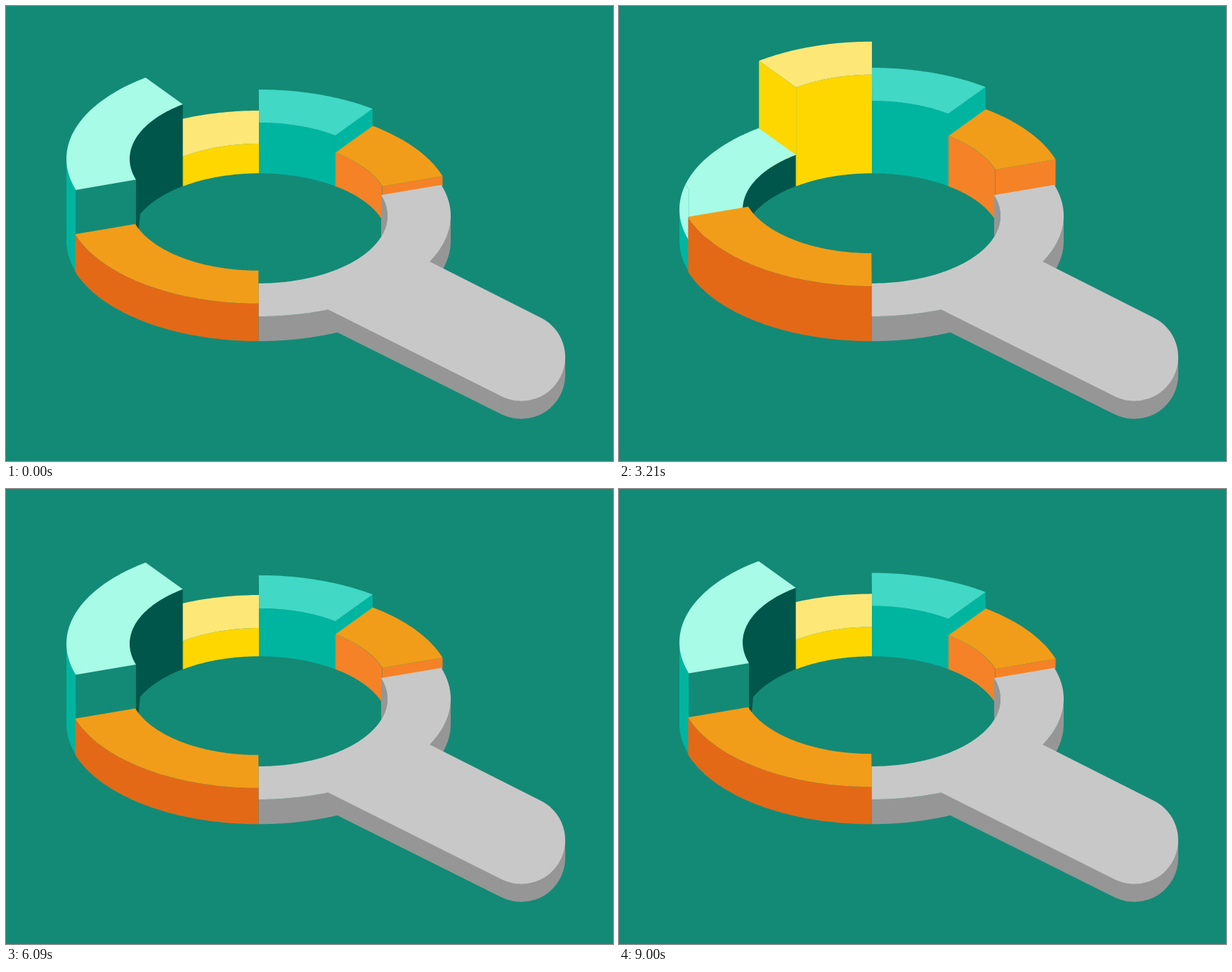
An HTML page with a canvas for the animation above (9.03 s loop, 864 by 648 pixels).

```html
<!DOCTYPE html>
<html lang="en">
<head>
<meta charset="utf-8">
<title>Magnifier chart</title>
<style>
html, body { margin: 0; width: 100%; height: 100%; overflow: hidden; background: #138a76; }
canvas { display: block; width: 864px; height: 648px; }
</style>
</head>
<body>
<canvas id="stage" width="864" height="648"></canvas>
<script>
const ctx = document.getElementById('stage').getContext('2d');
const LOOP = 9030, STEP = 30;
const BG = '#138a76';
const OUT = { rx: 273.5, ry: 143 }, IN = { rx: 183.5, ry: 96 };
const BASE = 334.3, GREY = 299;

// Height of the centre of each top face at the key times
const TIMES = [0, 3210, 4650, 6180, 7410, LOOP];
const KEYS = {
  mint:   [217.7, 289.7, 256, 218.2, 252.2, 217.7],
  yellow: [292, 193.7, 246.5, 297, 311.5, 292],
  teal:   [262, 231, 248, 267, 290, 262],
  amber:  [286.5, 262.7, 273.4, 285.1, 261.5, 286.5],
  front:  [280.8, 256, 267.7, 283.8, 300.3, 280.8]
};

function level(name, t) {
  const v = KEYS[name];
  let i = 0;
  while (i < TIMES.length - 2 && t >= TIMES[i + 1]) i++;
  const k = (t - TIMES[i]) / (TIMES[i + 1] - TIMES[i]);
  return v[i] + (v[i + 1] - v[i]) * k;
}

// Point on a ring edge; the angle is in degrees clockwise from the top
function at(e, deg, cx, cy) {
  const a = deg * Math.PI / 180;
  return [cx + e.rx * Math.sin(a), cy - e.ry * Math.cos(a)];
}

function arc(e, from, to, cx, cy) {
  const n = Math.ceil(Math.abs(to - from));
  return Array.from({ length: n + 1 }, (_, i) => at(e, from + (to - from) * i / n, cx, cy));
}

function trace(pts) {
  ctx.beginPath();
  pts.forEach(p => ctx.lineTo(p[0], p[1]));
}

function fill(color, pts) {
  trace(pts);
  ctx.closePath();
  ctx.fillStyle = color;
  ctx.fill();
}

const topFace = (a, b, cx, cy) => [...arc(OUT, a, b, cx, cy), ...arc(IN, b, a, cx, cy)];
const wall = (e, a, b, cx, y0, y1) => [...arc(e, a, b, cx, y0), ...arc(e, b, a, cx, y1)];
const endFace = (a, cx, y0, y1) => [at(OUT, a, cx, y0), at(IN, a, cx, y0), at(IN, a, cx, y1), at(OUT, a, cx, y1)];

function drawYellow(y) {
  fill('#fed700', endFace(-36, 360, y, BASE));
  fill('#fed700', wall(IN, -36, 0, 360, y, BASE));
  fill('#fde777', topFace(-36, 0, 360, y));
}

function drawTeal(y) {
  fill('#00b5a0', endFace(36, 361, y, BASE));
  fill('#00b5a0', wall(IN, -0.25, 36, 361, y, BASE));
  fill('#41d8c5', topFace(-0.25, 36, 361, y));
}

function drawAmber(y) {
  fill('#f58226', endFace(72, 361.3, y, GREY + 1));
  fill('#f58226', wall(IN, 36, 72, 361, y, BASE));
  fill('#f19d1a', topFace(36, 72, 361.3, y));
}

function handle(color, dy) {
  const tilt = Math.atan(0.498);
  ctx.beginPath();
  ctx.moveTo(458, 432 + dy);
  ctx.lineTo(603, 364 + dy);
  ctx.arc(733.5, 500 + dy, 62.5, tilt - Math.PI / 2, tilt + Math.PI / 2);
  ctx.closePath();
  ctx.fillStyle = color;
  ctx.fill();
}

function drawGrey() {
  const cx = 359.5, dark = '#969696', light = '#c8c8c8';
  fill(dark, arc(IN, 72, 108, cx, GREY));
  fill(dark, wall(OUT, 90, 180, cx, GREY, BASE));
  // Long side and rounded end of the handle
  handle(dark, 25.5);
  fill(dark, [[458, 432], [705.7, 556], [705.7, 581.5], [471, 464.5]]);
  ctx.fillStyle = dark;
  ctx.fillRect(733.5, 500, 62.5, 25.5);
  fill(light, topFace(72, 180, cx, GREY));
  handle(light, 0);
  fill(light, [[458, 432], [603, 364], [560, 340], [440, 410]]);
}

function drawMint(y) {
  const cx = 359.5;
  const foot = arc(IN, -66.7, -36, cx, BASE);
  fill('#00564a', [...arc(IN, -36, -108, cx, y), [184.9, 333], [187.6, 333], ...foot]);
  fill('#00b5a0', wall(OUT, -90, -108, cx, y, BASE));
  fill(BG, endFace(-108, cx, y, BASE));
  const top = topFace(-36, -108, cx, y);
  fill('#a8fbe6', top);

  // Faint seam where the top face stands at its highest
  const rest = KEYS.mint[0];
  if (y < rest + 6) return;
  ctx.save();
  trace(top);
  ctx.clip();
  trace([...arc(OUT, -90, -108, cx, rest), [99.4, y + 44]]);
  ctx.strokeStyle = 'rgba(0,150,130,0.28)';
  ctx.lineWidth = 0.8;
  ctx.stroke();
  ctx.restore();
}

function drawFront(y) {
  const cx = 358.5;
  fill('#e36917', wall(OUT, 179.8, 252, cx, y, BASE));
  fill('#f19d1a', topFace(179.75, 252, cx, y));
}

function draw(t) {
  ctx.fillStyle = BG;
  ctx.fillRect(0, 0, 864, 648);
  drawYellow(level('yellow', t));
  drawTeal(level('teal', t));
  drawAmber(level('amber', t));
  drawGrey();
  drawMint(level('mint', t));
  drawFront(level('front', t));
}

let start = null;
function tick(now) {
  if (start === null) start = now;
  const t = Math.max(0, now - start) % LOOP;
  draw(Math.floor(t / STEP) * STEP);
  requestAnimationFrame(tick);
}
draw(0);
requestAnimationFrame(tick);
</script>
</body>
</html>
```
